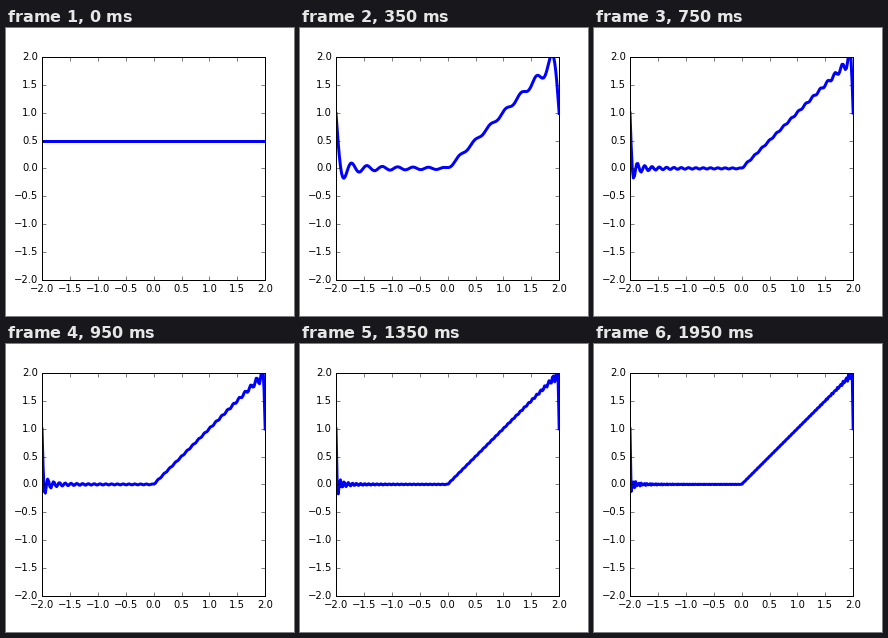
Recreate the animation shown at these times as a matplotlib script. Size 288 by 288 pixels, loop 2 s.

```python
import numpy as np
import matplotlib.pyplot as plt
from matplotlib.animation import FuncAnimation

FRAMES = 40
INTERVAL = 50
HALF = 2.0  # half the period

plt.style.use("classic")
plt.rcParams.update({
    "font.family": "DejaVu Sans",
    "font.size": 10,
    "figure.dpi": 72,
    "savefig.dpi": 72,
    "figure.facecolor": "white",
    "savefig.facecolor": "white",
})


def ramp_series(x, terms):
    """Partial Fourier sum of max(x, 0) on [-HALF, HALF]."""
    n = np.arange(1, terms + 1)[:, None]
    sign = (-1.0) ** n
    t = n * np.pi * x / HALF
    a = HALF * (sign - 1) / (n * np.pi) ** 2
    b = -HALF * sign / (n * np.pi)
    return HALF / 4 + (a * np.cos(t) + b * np.sin(t)).sum(axis=0)


x = np.linspace(-HALF, HALF, 200)

fig = plt.figure(figsize=(4, 4), dpi=72)
fig.subplots_adjust(left=0.125, right=0.9, bottom=0.125, top=0.9)
ax = fig.add_subplot(111)
ax.set_xlim(-2, 2)
ax.set_ylim(-2, 2)
ticks = np.arange(-2, 2.1, 0.5)
ax.set_xticks(ticks)
ax.set_yticks(ticks)
line, = ax.plot(x, ramp_series(x, 0), color="#0000ff", lw=3)


def update(i):
    line.set_data(x, ramp_series(x, 2 * i))
    return line,


anim = FuncAnimation(fig, update, frames=FRAMES, interval=INTERVAL,
                     repeat=True, repeat_delay=0, blit=False)
plt.show()
```
